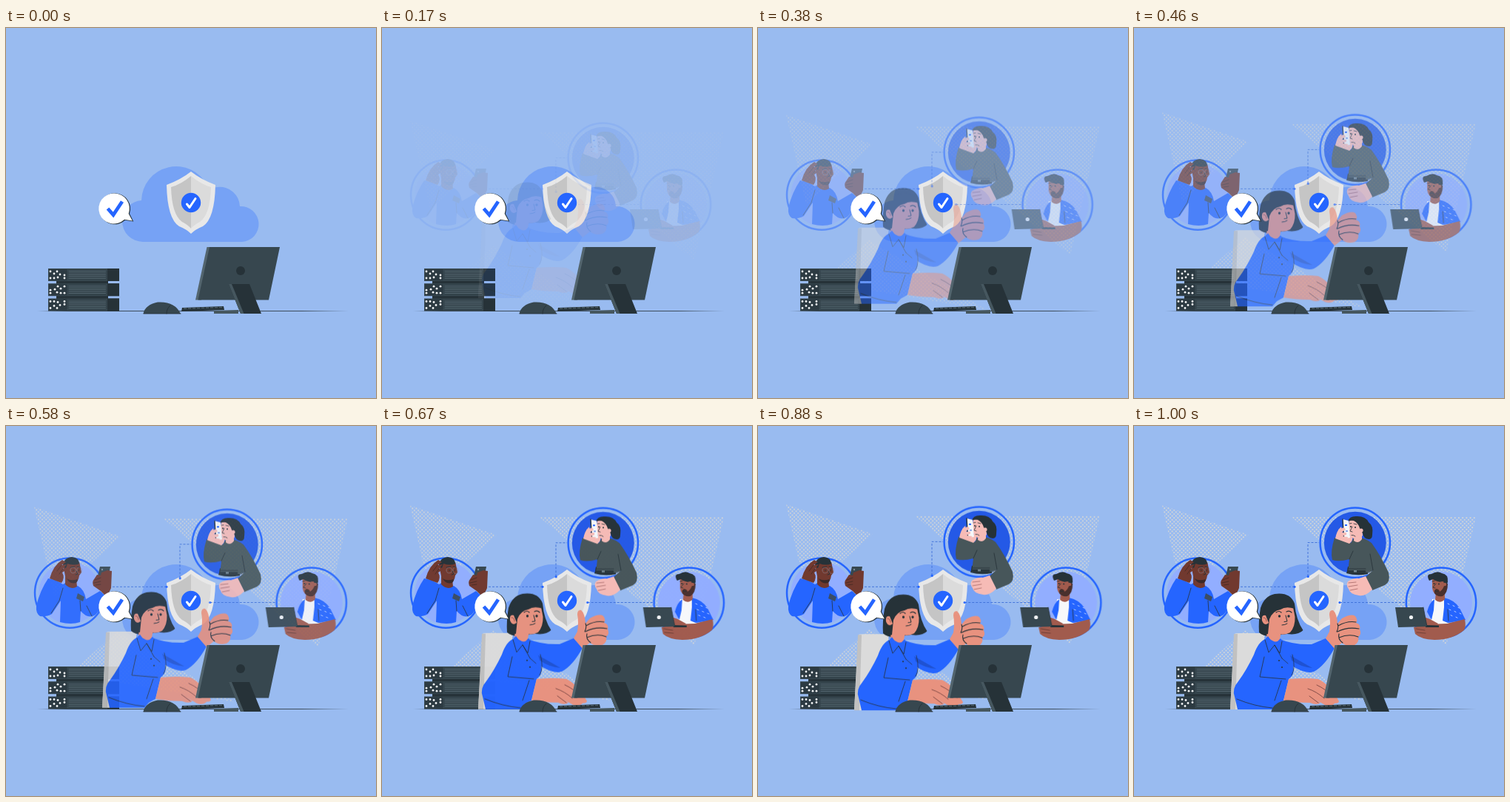
An HTML page with a canvas for the animation above (1.04 s loop, 500 by 500 pixels).

```html
<!DOCTYPE html>
<html lang="en">
<head>
<meta charset="utf-8">
<title>Secure cloud team</title>
<style>
html, body { margin: 0; width: 100%; height: 100%; overflow: hidden; background: #99bbf0; }
canvas { display: block; width: 500px; height: 500px; }
</style>
</head>
<body>
<canvas id="stage" width="500" height="500"></canvas>
<script>
const BLUE = '#2565ff', INK = '#263238', SLATE = '#37474f', GREY = '#dbdbdb';
const stage = document.getElementById('stage').getContext('2d');
let g = stage;

const fill = (d, color) => { g.fillStyle = color; g.fill(new Path2D(d)); };
const line = (d, color = INK, w = 0.8) => {
  g.strokeStyle = color;
  g.lineWidth = w;
  g.stroke(new Path2D(d));
};
const dot = (x, y, r, color) => {
  g.fillStyle = color;
  g.beginPath();
  g.arc(x, y, r, 0, Math.PI * 2);
  g.fill();
};
const box = (x, y, w, h, color) => { g.fillStyle = color; g.fillRect(x, y, w, h); };

// Paints once into its own layer so it can fade as a whole.
function layer(paint) {
  const c = document.createElement('canvas');
  c.width = c.height = 500;
  g = c.getContext('2d');
  g.lineCap = g.lineJoin = 'round';
  paint();
  return c;
}

function ring(x, y, inner) {
  dot(x, y, 42, inner);
  g.strokeStyle = BLUE;
  g.lineWidth = 2.5;
  g.beginPath();
  g.arc(x, y, 47.2, 0, Math.PI * 2);
  g.stroke();
}

function link(d, x, y) {
  g.save();
  g.lineCap = 'butt';
  g.setLineDash([3, 2]);
  line(d, '#3d6fd8', 0.9);
  g.restore();
  dot(x, y, 1.6, BLUE);
}

const patches = layer(() => {
  const gap = 5.2;
  g.clip(new Path2D('M38 107L155 147L65 228ZM213 123H462L422 297ZM150 276L85 333L310 371Z'));
  for (let row = 0; row < 104; row++)
    for (let x = 36 + (row % 2) * gap / 2; x < 464; x += gap)
      dot(x, 106 + row * gap / 2, 1.1, '#cfd4d9');
});

const cloud = layer(() => {
  fill('M157 261A28 28 0 0 1 183 233A47 47 0 0 1 272 213Q279 216 286 215A27 27 0 0 1 316 241A24 24 0 0 1 319 289H185A28 28 0 0 1 157 261Z', '#76a2f5');
});

const shield = layer(() => {
  fill('M250 194Q264 205 283 212Q282 258 266 268Q256 272 250 278Q244 272 234 268Q218 258 217 212Q236 205 250 194Z', '#e8e8e8');
  fill('M250 200Q237 211 223 215Q224 252 238 262Q246 266 250 271Z', '#c5c5c5');
  fill('M250 200Q263 211 277 215Q276 252 262 262Q254 266 250 271Z', GREY);
  dot(250, 236, 13.2, BLUE);
  line('M244.5 238L248 242.5L256 230.5', '#fff', 3);
});

const servers = layer(() => {
  const lights = [[3, 4], [12, 4], [8, 7], [16, 8], [22, 9], [3, 13], [8, 13], [13, 12], [22, 13]];
  box(68, 340, 70, 28, INK);
  [325, 345.2, 365.5].forEach((y, i) => {
    box(57, y, 96, 17, SLATE);
    box(137, y, 16, 17, INK);
    box(58, y + 1, 24.5, 15, '#2c3a42');
    box(84, y + 2, 51.5, 13, '#303f47');
    for (let k = 0; k < 5; k++) box(84.5, y + 3.2 + k * 2.4, 50.5, 0.9, '#5a6d76');
    for (const [x, dy] of lights) dot(57 + (i === 1 ? 25 - x : x), y + (i === 2 ? 17 - dy : dy), 1.4, '#f1f3f4');
  });
  const fade = g.createLinearGradient(42, 0, 463, 0);
  [['0', 0], ['1', 0.1], ['1', 0.85], ['0', 1]].forEach(([a, at]) => fade.addColorStop(at, `rgba(38,50,56,${a})`));
  box(42, 382, 421, 0.8, fade);
});

const leftMan = layer(() => {
  const skin = '#71392f';
  ring(86.2, 225.6, '#92aeff');
  link('M144 217.3H217', 217, 217.3);
  // torso, raised arm, phone arm
  fill('M77 214L82 211Q90 217 97 216Q106 221 108 234L127 223Q133 227 137 236L121 255Q111 262 101 250L100 265Q88 269 73 265L74 236L62 254Q55 258 46 257Q40 253 41 243Q46 222 57 206Q67 207 77 214Z', BLUE);
  line('M77 219L72 236L61 253M100 236L101 250M116 257L109 243');
  fill('M97 226L106 231L104 237L95 233Z', '#3b4d65');
  fill('M80 203L95 207L96 217Q88 222 80 214Z', skin);
  fill('M77 187Q78 180 90 180Q100 181 100 188L102 198L99 202Q98 212 91 212Q84 212 80 203Z', skin);
  fill('M77 190Q77 178 89 177Q99 178 99 186Q93 189 83 186L81 192Z', INK);
  fill('M82 206Q87 210 97 207Q97 212.5 91 212.5Q85 212 82 206Z', '#3a2a2a');
  fill('M59 206Q64 188 76 181L81 184L75 188L82 187L77 193L82 194L76 198Q80 205 75 212Z', skin);
  line('M75 188L69 196M77 193L72 200', '#422923');
  line('M87 195A3.8 3.8 0 1 0 94.6 195A3.8 3.8 0 1 0 87 195M96 195A3.2 3.2 0 1 0 102 195A3.2 3.2 0 1 0 96 195', '#8c7f86', 0.6);
  dot(91, 195, 0.8, INK);
  dot(98, 195, 0.8, INK);
  line('M87 191L93 190M96 190L100 191M95 196L97 200L94 201', INK, 0.9);
  // hand with phone
  fill('M127 190L141 190L138 206L123 207Z', SLATE);
  dot(130, 194, 1.2, '#82929a');
  fill('M128 223L118 216Q116 210 119 207L123 201L128 202L129 198L137 195L143 196L142 219Q138 229 134 229Z', skin);
  line('M120 208L128 205M119 212L128 210M121 215L128 214', '#422923');
});

const topWoman = layer(() => {
  const skin = '#f6bbb6', knit = '#47565a';
  ring(298.8, 157.8, '#2459e6');
  link('M235 203V157.5H250', 235.2, 203.4);
  fill('M288 196L289 190H315L316 200Q301 203 287 199Z', INK);
  // sweater
  fill('M297 151Q310 149 321 158Q334 176 344 198Q347 211 339 215L322 222L313 204L323 195L315 198H289L291 180Q277 184 268 181Q265 170 271 151L293 158Z', knit);
  line('M291 180L296 169M319 173L323 195L315 199M289 193H313');
  line('M290 196.5H312', INK, 2.5);
  box(297, 195, 4, 2.5, '#71828b');
  fill('M313 203L322 221Q312 231 304 229Q291 227 290 220Q286 215 289 210Q298 205 304 206Z', skin);
  line('M290 212L300 211M290 217L302 215M292 222L302 220', '#9b5b5b', 0.7);
  // head
  fill('M298 144L308 145L308 153Q303 160 297 155Z', skin);
  fill('M291 128Q298 124 308 130L309 148Q303 155 297 152Q290 150 291 142L288.5 139Z', skin);
  fill('M289 129Q291 121 302 122Q313 122 317 130Q324 135 322 147Q322 153 317 153Q310 152 309 145L305 138Q303 131 297 128Q293 127 289 129Z', INK);
  dot(307, 141, 2.6, skin);
  dot(293, 136, 1, INK);
  dot(299, 137, 1, INK);
  line('M295 136L292 142L295 143M294 147.5Q297 147 299 149M291 132L294 131.5M297 132L301 133');
  fill('M272 152Q274 141 280 136L283 151L290 148Q298 148 294 156L291 159Z', skin);
  fill('M282 126L290 128L292 151L284 152Z', '#f5f6f8');
  line('M282 126L283.5 151', INK, 1.4);
  box(285, 133, 3, 2, BLUE);
  box(286, 141, 3, 2, '#8da8e8');
  fill('M276 140L284 137L286 140L280 144L287 144L287 147L281 149L289 150L288 153L278 154Z', skin);
});

const rightMan = layer(() => {
  const skin = '#a15b4d';
  ring(415, 238.7, '#92aeff');
  link('M278 238.5H367', 278, 238.5);
  fill('M403 234L420 233L426 270L400 270Z', '#f7f8fa');
  fill('M406 234Q399 239 396 251L402 262L405 249ZM419 232Q433 235 440 246L448 262L424 266L417 263L419 245Z', BLUE);
  line('M425 263L424 248');
  for (let k = 0; k < 8; k++) {
    const x = 424 + (k * 7) % 19, y = 240 + k * 2.6;
    line(`M${x} ${y}l2 1`, '#dce7ff', 0.8);
  }
  // head
  fill('M408 224L420 222L420 234Q414 241 407 235Z', skin);
  fill('M403 205Q411 202 421 207L422 222Q418 230 411 229Q404 227 403 219Z', skin);
  fill('M399 209Q394 200 402 200Q410 195 416 199Q425 200 424 211L421 218L418 210Q409 211 404 207Z', INK);
  fill('M420 213L424 213Q424 226 417 230Q409 231 406 226Q405 221 409 220Q413 221 413 224Q418 221 420 213Z', '#4a302d');
  dot(420, 214, 2.2, skin);
  dot(405.5, 213, 1, INK);
  dot(412, 213.5, 1, INK);
  line('M408 213L404 218L407 219M403 210L406 209.5M410 209.5L414 210.5M407 223L411 223.5');
  // arms and laptop
  fill('M389 257L400 261L411 267L407 271H391Z', skin);
  fill('M378 272L397 268L423 267L447 261Q449 271 446 276Q430 289 406 289Q387 288 380 281Z', skin);
  line('M381 274L393 276M382 279L394 280', '#673b34');
  fill('M394 269L412 269.5V272L394 272Z', INK);
  fill('M353 245H391L396 271L357 272Z', SLATE);
  line('M391 245L396 271', '#26343b');
  dot(374.5, 258.5, 2.6, '#f1f3f4');
});

const woman = layer(() => {
  const skin = '#e8927f';
  fill('M136 281Q137 280 142 280H177L164 383H130Z', GREY);
  fill('M135 281H140L137 383H130Z', '#c1c1c1');
  // hair behind
  fill('M169 279Q168 262 171 246Q176 230 190 227Q211 224 217 240Q219 262 228.5 276Q222 283 207 281L184 284Q174 284 169 279Z', INK);
  // raised arm
  fill('M197 288Q216 296 240 295L259 287L271 300Q258 324 243 332Q231 336 212 323Z', BLUE);
  fill('M204 306L241 327Q226 326 213 317Z', '#1f52d2');
  // torso and near arm
  fill('M179 287Q168 291 162 309Q152 330 141 345Q132 355 136 366L140 383H187L193 376L202 371L209 342Q219 335 214 320Q210 301 198 288Z', BLUE);
  line('M176 312L170 339L205 342M139 369Q163 379 187 381M199 344L190 371');
  line('M200 314L208 321M214 309Q219 327 213 337', INK, 0.7);
  dot(196, 317, 1, INK);
  dot(200, 326, 1, INK);
  // neck and face
  fill('M181 268L199 277L197 288Q193 294 187 290L179 286Z', skin);
  fill('M181 250Q189 243 215 245L217.5 258Q218 271 211 279Q200 285 189 278L181 269Z', skin);
  fill('M174 264Q173 241 189 235Q210 229 217.5 247Q205 243 198 248Q187 250 183 261L181 281L173 281Z', INK);
  fill('M178 256Q172 254 173 263Q176 271 182 266Z', skin);
  line('M175 259Q179 259 179 264', '#7a403b', 0.7);
  dot(196.5, 257, 1.7, INK);
  dot(209, 257, 1.7, INK);
  line('M192 252Q196 249 199 252M206 251Q210 249 213 252', INK, 1.2);
  line('M205 256L207 264L203 264.5M200 269Q204 269 207 267', INK, 1);
  fill('M178 287L181 284L190 296L198 287L201 291L196 308L188 298L183 304Z', BLUE);
  line('M177 289L182 306L190 296L197 307L200 291M190 296L200 314');
  // keyboard hand
  fill('M209 342Q232 340 249 342Q264 349 277 372Q276 376 269 374L259 368L272 374Q267 380 258 377L244 369L252 374Q247 378 238 374Q218 374 202 371Z', skin);
  line('M235 355Q247 359 257 368M247 350Q260 356 269 366M237 365L249 374', '#6c3d3b');
  // thumb up
  fill('M259 287L264 278Q266 265 264 255Q264 248 269 249Q274 253 275 267L281 260Q294 253 299 257Q303 262 300 266Q307 268 305 275Q308 281 303 285Q305 292 298 296Q288 299 281 293L271 301Z', skin);
  line('M275 267Q277 272 274 278M276 270Q288 263 300 265M275 278Q288 271 304 274M277 286Q291 280 303 285M282 293Q275 288 277 281', INK, 1.1);
});

const front = layer(() => {
  // bubble
  fill('M147.5 223.3A21 21 0 0 1 167 251L172.3 261.6L161 259.8A21 21 0 1 1 147.5 223.3Z', INK);
  fill('M147 223.6A20.5 20.5 0 0 1 165.7 251L170.8 260.4L160 258.8A20.5 20.5 0 1 1 147 223.6Z', '#fff');
  g.lineCap = 'butt';
  g.lineJoin = 'miter';
  line('M137.5 244L145 252.5L157 234.5', BLUE, 4.8);
  g.lineJoin = g.lineCap = 'round';
  // mouse and keyboard
  fill('M185.5 386Q188 374 205 370.5Q228 369 236 386Z', SLATE);
  line('M186 386H236M222 375Q217 379 217 386', INK, 0.9);
  fill('M238 378L294 376L295 381L237 383Z', INK);
  for (let k = 0; k < 9; k++) box(240 + k * 6, 378.3 - k * 0.2, 4.2, 1.5, '#4b5c65');
  // monitor
  fill('M281 382L314 381V386H281Z', '#46575f');
  fill('M271.5 296H278L264 367.5H256Z', '#53656e');
  fill('M275 296H370L355 367.5H259.5Z', SLATE);
  dot(317, 328, 6, INK);
  fill('M301 346H329L345 386H317Z', INK);
  fill('M301 346H305L321.5 386H317Z', '#46575f');
});

// y for a given x on cubic-bezier(.36, -.01, .5, 1.38)
function ease(x) {
  if (x <= 0) return 0;
  if (x >= 1) return 1;
  const curve = (a, b, s) => 3 * (1 - s) ** 2 * s * a + 3 * (1 - s) * s * s * b + s ** 3;
  let lo = 0, hi = 1;
  for (let i = 0; i < 24; i++) {
    const mid = (lo + hi) / 2;
    if (curve(0.36, 0.5, mid) < x) lo = mid; else hi = mid;
  }
  return curve(-0.01, 1.38, lo);
}

const LOOP = 1040, FPS = 24, SLIDE = 20;

function draw(ms) {
  const step = Math.min(FPS, Math.floor((ms + 3.4) * FPS / 1000));
  const p = ease(step / FPS), off = SLIDE * (1 - p);
  const alpha = Math.max(0, Math.min(1, p));
  const put = (img, x, y) => {
    stage.globalAlpha = alpha;
    stage.drawImage(img, x, y);
    stage.globalAlpha = 1;
  };
  stage.fillStyle = '#99bbf0';
  stage.fillRect(0, 0, 500, 500);
  put(patches, 0, off);
  for (const img of [cloud, servers, shield]) stage.drawImage(img, 0, 0);
  put(leftMan, 0, 0);
  put(topWoman, 0, off);
  put(rightMan, -off, 0);
  put(woman, 0, -off);
  stage.drawImage(front, 0, 0);
}

const start = performance.now();
function tick() {
  draw((performance.now() - start) % LOOP);
  requestAnimationFrame(tick);
}
tick();
</script>
</body>
</html>
```
